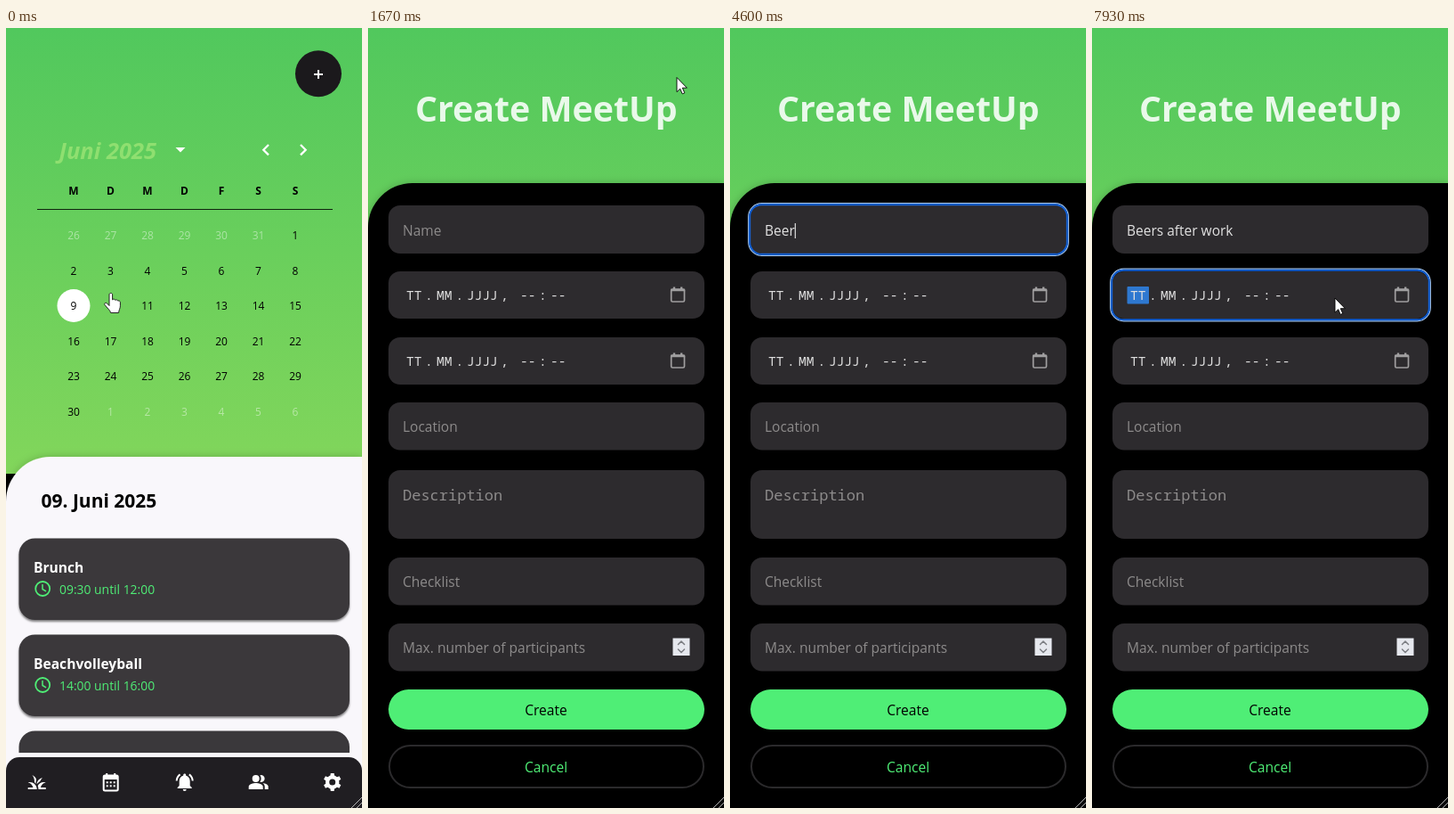
Write an HTML page that moves like this. It is 400 px wide and 875 px high and loops after 8000 ms.

```html
<!DOCTYPE html>
<html lang="en">
<head>
<meta charset="utf-8">
<title>Calendar and new entry</title>
<style>
  html, body { margin: 0; width: 100%; height: 100%; overflow: hidden; background: #000; }
  svg { display: block; width: 100vw; height: 100vh; }
  text { font-family: "Open Sans", "Noto Sans", sans-serif; white-space: pre; }
  .mono { font-family: "Noto Sans Mono", "DejaVu Sans Mono", monospace; }
  .bold { font-weight: 700; }
  .line { fill: none; stroke-linecap: round; stroke-linejoin: round; }
</style>
</head>
<body>
<svg id="stage" viewBox="0 0 400 875" preserveAspectRatio="none"></svg>
<script>
const LOOP = 8000;
const SELECT_DAY = 200, OPEN_FORM = 1400, FOCUS_NAME = 2800, FOCUS_DATE = 7600;
const TITLE = 'Beers after work';
const GREEN = '#4fee76', FIELD = '#2d2b2e', HINT = '#8d8b8b';

const stage = document.getElementById('stage');
const $ = id => document.getElementById(id);

const text = (x, y, size, fill, str, extra = '') =>
  `<text x="${x}" y="${y}" font-size="${size}" fill="${fill}" ${extra}>${str}</text>`;
const box = (x, y, w, h, r, fill, extra = '') =>
  `<rect x="${x}" y="${y}" width="${w}" height="${h}" rx="${r}" fill="${fill}" ${extra}/>`;
const path = (d, extra = '') => `<path d="${d}" ${extra}/>`;
const line = (d, color, width) => path(d, `class="line" stroke="${color}" stroke-width="${width}"`);
const at = (x, y, inner) => `<g transform="translate(${x} ${y})">${inner}</g>`;
const MID = 'text-anchor="middle"', BOLD = 'class="bold"';

function calendar() {
  let out = '';
  const colX = i => 76 + 41.5 * i, rowY = j => 311.5 + 39.5 * (j - 2);
  [...'MDMDFSS'].forEach((d, i) => out += text(colX(i), 187, 12, '#000', d, `${MID} ${BOLD}`));
  for (let k = 0; k < 42; k++) {
    const day = k - 5, inMonth = day >= 1 && day <= 30;
    const label = day < 1 ? day + 31 : day > 30 ? day - 30 : day;
    const fill = inMonth ? '#000' : 'rgba(255,255,255,.45)';
    const id = day === 10 ? 'id="pickedDay"' : '';
    out += text(colX(k % 7), rowY(Math.floor(k / 7)) + 4.5, 12, fill, label, `${MID} ${id}`);
  }
  return `<circle id="today" cx="76" cy="311.5" r="18.5"/>
    <circle id="picked" cx="117.6" cy="311.5" r="18.7" fill="#fff"/>` + out;
}

function card(y, title, hours) {
  return box(14.5, y, 371.5, 91.5, 18, '#3a383b', 'filter="url(#cardShadow)"') +
    text(31, y + 38, 15.6, '#fff', title, BOLD) +
    `<circle cx="41.2" cy="${y + 56.5}" r="8" fill="none" stroke="${GREEN}" stroke-width="1.8"/>` +
    line(`M41 ${y + 52}v5l3.6 2.2`, GREEN, 1.5) +
    text(60, y + 62.5, 13.9, GREEN, hours);
}

function navIcons() {
  const grass = path('M12 20H2v-2h5.75C7 15.2 4.8 13 2 12.3c5-1.2 10 2.5 10 7.7z') +
    path('M22 12.3c-4-1-8 1-9 4 .5 1.2.8 2.4.8 3.7H22v-2h-5.8c.7-2.8 3-5 5.8-5.7z') +
    path('M15.6 11c.6-1.5 1.4-2.8 2.6-3.8C15 7.6 12 10.5 12 14.3c1-1.4 2.2-2.5 3.6-3.3z') +
    path('M11.4 8.9C10.6 6.7 9 5 6.7 4c2 2.4 2.7 5 2.6 7.9.6.6 1 1.2 1.5 1.9 0-1.8.1-3.4.6-4.9z');

  let month = box(4, 4.5, 16, 17, 1.5, 'none', 'stroke="#fff" stroke-width="2"') +
    box(4, 4, 16, 5, 0, '#fff') + box(6.5, 2, 2, 4, 0, '#fff') + box(15.5, 2, 2, 4, 0, '#fff');
  for (let i = 0; i < 6; i++) month += box(7 + 4 * (i % 3), 11.3 + 4 * Math.floor(i / 3), 2, 2, 0, '#fff');

  const bell = path('M12 2.5c-.9 0-1.5.7-1.5 1.5v.7C7.6 5.4 6 7.9 6 11v5l-2 2v1h16v-1l-2-2v-5c0-3.1-1.6-5.6-4.5-6.3V4c0-.8-.6-1.5-1.5-1.5zM10 20h4a2 2 0 0 1-4 0z') +
    `<path d="M6.9 3.4A9.3 9.3 0 0 0 3 10.5M17.1 3.4A9.3 9.3 0 0 1 21 10.5" fill="none" stroke="#fff" stroke-width="2"/>`;

  const people = '<circle cx="9" cy="8" r="4"/>' +
    path('M1 20v-3c0-2.7 5.3-4 8-4s8 1.3 8 4v3z') +
    path('M13.7 4.2a4 4 0 1 1 0 7.6c1.7-2.2 1.7-5.4 0-7.6zM16.7 13.1c2.8.4 6.3 1.7 6.3 3.9v3h-4v-3c0-1.7-1-3-2.3-3.9z');

  let gear = '<circle cx="12" cy="12" r="5.6" fill="none" stroke="#fff" stroke-width="4.2"/>';
  for (let a = 0; a < 360; a += 60)
    gear += path('M9.6 5.5 10.1 2h3.8l.5 3.5z', `transform="rotate(${a} 12 12)"`);

  return `<g fill="#fff">${[grass, month, bell, people, gear]
    .map((icon, i) => at(22.7 + 83 * i, 834, icon)).join('')}</g>`;
}

function home() {
  return `<g id="home">` +
    `<circle cx="351" cy="51.3" r="26" fill="#1b191c"/>` +
    path('M346 52h10M351 47v10', 'stroke="#fff" stroke-width="2"') +
    text(59.5, 146.5, 25.5, '#8fdf70', 'Juni 2025', 'class="bold" font-style="italic"') +
    path('M190.5 134h11l-5.5 5.5z', 'fill="#fff"') +
    `<path d="M295 131l-5.7 5.7 5.7 5.7M331 131l5.7 5.7-5.7 5.7" fill="none" stroke="#fff" stroke-width="2.3"/>` +
    path('M35 203.5H367', 'stroke="#10240f" stroke-width="1"') +
    calendar() +
    path('M0 531a50 50 0 0 1 50-50H400V875H0z', 'fill="#f9f7fb" filter="url(#sheetShadow)"') +
    text(39.5, 537.5, 21, '#000', '', 'id="dayTitle" class="bold"') +
    `<g id="events">${card(572.5, 'Brunch', '09:30 until 12:00')}${card(680.5, 'Beachvolleyball', '14:00 until 16:00')}
      <path d="M14.5 813V806.5a18 18 0 0 1 18-18H368a18 18 0 0 1 18 18V813z" fill="#3a383b"/></g>` +
    text(31, 575, 15.9, '#7d7b7e', 'No MeetUps on this day', 'id="noEvents"') +
    path('M0 875V833a15 15 0 0 1 15-15H385a15 15 0 0 1 15 15V875z', 'fill="#201e22"') +
    navIcons() + `</g>`;
}

function dateField(y, id) {
  const mid = y + 26.5, base = y + 31.5;
  const parts = [[43, 'TT'], [64, '.'], [77, 'MM'], [98.5, '.'], [111, 'JJJJ'],
    [149, ','], [171, '--'], [192, ':'], [205, '--']];
  return box(23, y, 355, 53, 13, FIELD) +
    (id ? box(39.5, mid - 9.5, 24.5, 19.5, 1, '#2e78d0', `id="${id}"`) : '') +
    parts.map(([x, s]) => text(x, base, 14.5, '#dedede', s, 'class="mono"')).join('') +
    box(340.7, mid - 6.5, 14.8, 14, 1.5, 'none', 'stroke="#a09fa0" stroke-width="1.7"') +
    path(`M340 ${mid - 5.5}h16.2M344 ${mid - 9}v3M352.2 ${mid - 9}v3`, 'stroke="#a09fa0" stroke-width="2.4"');
}

function form() {
  const field = (y, h, label, base, extra = '') =>
    box(23, y, 355, h, 13, FIELD) + text(39, base, 15.5, HINT, label, extra);
  return `<g id="form">` +
    text(200.3, 105, 39.3, '#e9f9ea', 'Create MeetUp', `${MID} ${BOLD}`) +
    path('M0 224a50 50 0 0 1 50-50H400V875H0z', 'fill="#000" filter="url(#sheetShadow)"') +
    field(199, 54, 'Name', 232.5, 'id="nameHint"') +
    text(39, 232.5, 15.5, '#e2e2e2', '', 'id="nameValue"') +
    box(0, 219, 1, 17, 0, '#fff', 'id="caret"') +
    dateField(273, 'dayPart') + dateField(347) +
    field(420, 53.5, 'Location', 453) +
    box(23, 496, 355, 77, 13, FIELD) + text(39, 529.5, 17, HINT, 'Description', 'class="mono"') +
    field(594, 53.5, 'Checklist', 627) +
    field(668, 53.5, 'Max. number of participants', 701) +
    box(342.5, 684.5, 19, 19.5, 0, '#e6e8ee') +
    line('M348.5 691.5l3.5-3.5 3.5 3.5M348.5 697l3.5 3.5 3.5-3.5', '#7b7d82', 1.5) +
    box(23, 742, 355, 45, 22.5, GREEN) + text(200, 771, 15.6, '#000', 'Create', MID) +
    box(24, 805, 353, 47, 23.5, '#000', 'stroke="#2b2a2c" stroke-width="2"') +
    text(200, 834.5, 15.6, GREEN, 'Cancel', MID) +
    `<g id="ring" fill="none">${box(20.7, 196.7, 359.6, 58.6, 15, 'none', 'stroke="#a9cdf8" stroke-width="1.2"')}
      ${box(22.2, 198.2, 356.6, 55.6, 13.5, 'none', 'stroke="#1462d8" stroke-width="2"')}</g></g>`;
}

const pointers = `<g id="pointer">
  <path id="arrow" d="M0 0V16.2l3.7-3.5 2.5 5.7 2.6-1.1-2.5-5.6H11.4z" fill="#fff" stroke="#000" stroke-width=".9"/>
  <path id="hand" d="M-2 1.5c0-2 3.6-2 3.6 0V7.4c.6-1.2 3-.9 3.2.5.8-1 2.8-.5 3 .8 1-.7 2.6 0 2.6 1.6v4c0 3-1.6 4.3-1.8 7.7H-.4c-.4-3-4.2-5.400-6.600-9-1-1.700 1-2.900 2.500-1.600L-2 14z" fill="#fff" stroke="#222" stroke-width="1" stroke-linejoin="round"/>
  <g id="beam" fill="none"><path d="M-4-8.500h3l1 1 1-1h3M-4 8.500h3l1-1 1 1h3M0-7.500v15" stroke="#000" stroke-width="2.600"/>
    <path d="M-4-8.500h3l1 1 1-1h3M-4 8.500h3l1-1 1 1h3M0-7.500v15" stroke="#fff" stroke-width="1.200"/></g></g>`;

stage.innerHTML = `<defs>
  <linearGradient id="sky" x2="0" y2="1"><stop stop-color="#51c85d"/><stop offset="1" stop-color="#82d65b"/></linearGradient>
  <filter id="sheetShadow" x="-10%" y="-10%" width="120%" height="120%"><feDropShadow dx="0" dy="0" stdDeviation="5" flood-opacity=".2"/></filter>
  <filter id="cardShadow" x="-5%" y="-10%" width="110%" height="130%"><feDropShadow dx="0" dy="2" stdDeviation="1.3" flood-opacity=".5"/></filter>
  </defs>` + box(0, 0, 400, 500, 0, 'url(#sky)') + home() + form() +
  path('M388 875l12-12M394 875l6-6', 'stroke="#b5b5b5" stroke-width="1"') + pointers;

// Pointer stops: time, x, y
const stops = [[0, 118, 297.5], [330, 118, 297.5], [870, 412, 80], [1050, 412, 80], [1270, 347, 55.5],
  [1830, 347, 55.5], [2500, 165, 238.5], [7000, 165, 238.5], [7450, 273, 303], [LOOP, 273, 303]];

// The first word is typed quickly, the rest after a short pause.
const keyTime = i => i < 4 ? 4040 + 170 * i : 4800 + 140 * (i - 4);

function pointerAt(t) {
  const i = stops.findIndex((s, k) => k && t <= s[0]);
  const [t0, x0, y0] = stops[i - 1], [t1, x1, y1] = stops[i];
  const u = (t - t0) / (t1 - t0), e = u * u * (3 - 2 * u);
  return [x0 + (x1 - x0) * e, y0 + (y1 - y0) * e];
}

const show = (id, on) => $(id).setAttribute('display', on ? 'inline' : 'none');

function render(t) {
  const picked = t >= SELECT_DAY, formOpen = t >= OPEN_FORM;
  show('home', !formOpen);
  show('form', formOpen);

  $('dayTitle').textContent = (picked ? '10' : '09') + '. Juni 2025';
  $('today').setAttribute('fill', picked ? 'none' : '#fff');
  $('today').setAttribute('stroke', picked ? 'rgba(255,255,255,.65)' : 'none');
  show('picked', picked);
  show('pickedDay', picked);
  show('events', !picked);
  show('noEvents', picked);

  const typed = [...TITLE].filter((c, i) => t >= keyTime(i)).length;
  const onName = t >= FOCUS_NAME && t < FOCUS_DATE, onDate = t >= FOCUS_DATE;
  $('nameValue').textContent = TITLE.slice(0, typed);
  show('nameHint', !typed);
  show('ring', onName || onDate);
  $('ring').setAttribute('transform', `translate(0 ${onDate ? 73.5 : 0})`);
  show('dayPart', onDate);

  const blinkStart = typed ? keyTime(typed - 1) : 3200;
  show('caret', onName && t >= blinkStart && (t - blinkStart) % 1000 < 500);
  const width = typed && formOpen ? $('nameValue').getComputedTextLength() : 0;
  $('caret').setAttribute('x', 39 + width);

  const [x, y] = pointerAt(t);
  const overButton = !formOpen && Math.hypot(x - 351, y - 51) < 26;
  const overDays = !formOpen && Math.hypot(x - 118, y - 311) < 20;
  const overName = formOpen && y > 199 && y < 253;
  show('pointer', t < keyTime(0) || t >= 7000);
  show('hand', overButton || overDays);
  show('beam', overName);
  show('arrow', !overButton && !overDays && !overName);
  $('pointer').setAttribute('transform', `translate(${x} ${y})`);
}

function tick() {
  render(performance.now() % LOOP);
  requestAnimationFrame(tick);
}
tick();
</script>
</body>
</html>
```
